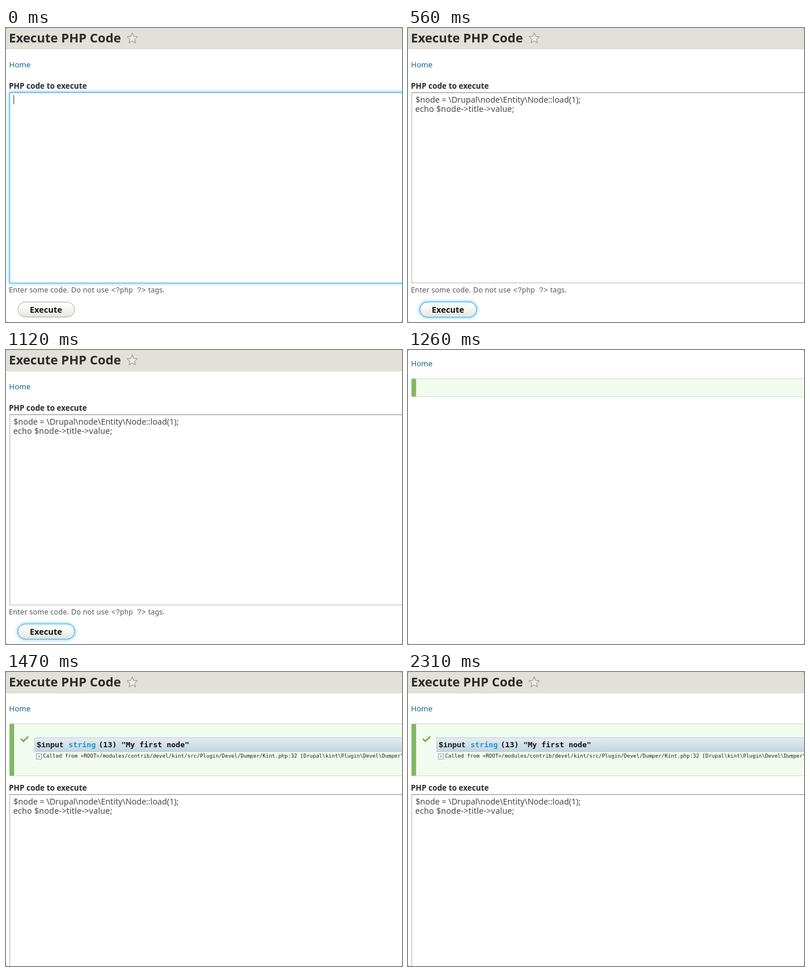
Recreate the animation shown at these times as an HTML page. Size 684 by 508 pixels, loop 2380 ms.

```html
<!DOCTYPE html>
<html lang="en">
<head>
<meta charset="utf-8">
<title>Execute PHP Code</title>
<style>
html, body { margin: 0; width: 100%; height: 100%; overflow: hidden; background: #fff; }
#stage { position: relative; width: 684px; height: 508px; overflow: hidden; background: #fff; }
#stage div { position: absolute; box-sizing: border-box; }
svg { position: absolute; left: 0; top: 0; width: 684px; height: 508px; overflow: visible; }
text { font-family: "Noto Sans", "Open Sans", sans-serif; white-space: pre; }
.bold { font-weight: 700; }
.mono { font-family: "DejaVu Sans Mono", monospace; }
.courier { font-family: "Liberation Mono", monospace; }

#page, #form { left: 0; top: 0; width: 684px; height: 508px; }
#header { left: 0; top: 0; width: 684px; height: 37px; background: #e1e1d9; }
#area { left: 6px; top: 111px; width: 700px; height: 330px; background: #fff;
  border: 1px solid #b8b8b8; border-top-color: #999; box-shadow: inset 0 1px 2px rgba(0, 0, 0, .12); }
#button { left: 20px; top: 473px; width: 99px; height: 27px; border-radius: 14px;
  border: 1px solid #a6a6a6; background: linear-gradient(#fff, #f6f6f3 45%, #e5e5df); }
.focus { inset: -1px; border: 1px solid #45b0e6; border-radius: inherit;
  box-shadow: 0 0 5px 1px #74cdf8; }

#message { left: 6px; top: 89px; width: 700px; height: 91px; overflow: hidden; background: #f3faef;
  border: 1px solid #cbe2bf; border-left: 8px solid #7fb964; border-radius: 2px 0 0 2px; }
#dump { left: 49px; top: 113px; width: 660px; height: 25px; border: 1px solid #b9cfdb;
  background: linear-gradient(#e4edf1, #c1d5e0); }

/* One shared 2380 ms clock */
.anim { animation: 2.38s step-end infinite; }
#page { animation-name: scroll; }
#form { animation-name: form; }
#message { animation-name: message; }
#result { animation-name: result; }
#code { animation-name: typed; }
#caret { animation-name: caret; }
#caretEnd { animation-name: caretEnd; }
#area .focus { animation-name: blur; }
#button .focus { animation-name: focus; }
@keyframes scroll {
  0%, 61.765% { transform: none; }
  52.941% { transform: translateY(-40px); }
  100% { transform: none; }
}
@keyframes form {
  0% { transform: none; opacity: 1; }
  52.941% { transform: none; opacity: 0; }
  58.824%, 100% { transform: translateY(100px); opacity: 1; }
}
@keyframes message {
  0% { opacity: 0; height: 32px; }
  52.941% { opacity: 1; height: 32px; }
  58.824%, 100% { opacity: 1; height: 91px; }
}
@keyframes result { 0% { opacity: 0; } 58.824%, 100% { opacity: 1; } }
@keyframes typed { 0% { opacity: 0; } 2.941%, 100% { opacity: 1; } }
@keyframes caret { 0% { opacity: 1; } 2.941%, 100% { opacity: 0; } }
@keyframes caretEnd { 0%, 14.706%, 100% { opacity: 0; } 2.941% { opacity: 1; } }
@keyframes blur {
  0% { opacity: 1; }
  14.706% { opacity: 1; animation-timing-function: steps(3, start); }
  23.529%, 100% { opacity: 0; }
}
@keyframes focus {
  0% { opacity: 0; }
  14.706% { opacity: 0; animation-timing-function: steps(3, start); }
  23.529% { opacity: 1; }
  52.941%, 100% { opacity: 0; }
}
</style>
</head>
<body>
<div id="stage">
  <div id="page" class="anim">
    <div id="header"></div>
    <svg>
      <text class="bold" x="5" y="25" font-size="21.7" fill="#2b2b2b">Execute PHP Code</text>
      <path id="star" fill="#ecece7" stroke="#8c8c88"/>
      <text x="5.3" y="68" font-size="13" fill="#14648f">Home</text>
    </svg>

    <div id="form" class="anim">
      <div id="area"><div class="focus anim"></div></div>
      <div id="button"><div class="focus anim"></div></div>
      <svg>
        <text class="bold" x="5" y="105" font-size="13.3" fill="#2b2b2b">PHP code to execute</text>
        <g id="code" class="anim" font-size="14" fill="#484848">
          <text x="13" y="129">$node = \Drupal\node\Entity\Node::load(1);</text>
          <text x="12.5" y="145" letter-spacing=".2">echo $node-&gt;title-&gt;value;</text>
        </g>
        <path id="caret" class="anim" d="M13.5 116v16" stroke="#333"/>
        <path id="caretEnd" class="anim" d="M185.5 132v16" stroke="#333"/>
        <g font-size="12.4" fill="#555">
          <text x="5" y="457" letter-spacing=".19">Enter some code. Do not use</text>
          <text class="courier" x="182" y="457">&lt;?php ?&gt;</text>
          <text x="245.5" y="457">tags.</text>
        </g>
        <text class="bold" x="41" y="492" font-size="14.3" fill="#111">Execute</text>
      </svg>
    </div>

    <div id="message" class="anim"></div>
    <div id="result" class="anim">
      <div id="dump"></div>
      <svg>
        <path d="M25.5 115.5l4.5 4 8.5-8" fill="none" stroke="#77b55a" stroke-width="3"/>
        <g class="bold" font-size="13" fill="#111">
          <text class="courier" x="53" y="130">$input</text>
          <text class="mono" x="108" y="130" fill="#2194d2">string</text>
          <text class="mono" x="160" y="130">(13) "My first node"</text>
        </g>
        <path d="M52.5 141.5h9v9h-9zM54.5 146h5M57 143.5v5" fill="#fff" stroke="#8a9aa3"/>
        <text class="mono" x="64" y="148" font-size="9" fill="#1d1d1d">Called from &lt;ROOT&gt;/modules/contrib/devel/kint/src/Plugin/Devel/Dumper/Kint.php:32 [Drupal\kint\Plugin\Devel\Dumper\Kint-&gt;export()]</text>
      </svg>
    </div>
  </div>

  <svg>
    <path d="M0 0h684v508H0zM2 0Q0 0 0 2V506Q0 508 2 508H682Q684 508 684 506V2Q684 0 682 0z"
      fill="#555" fill-rule="evenodd"/>
  </svg>
</div>
<script>
const points = Array.from({ length: 10 }, (_, i) => {
  const r = i % 2 ? 4.3 : 9.6, a = (i * 36 - 90) * Math.PI / 180;
  return `${(218 + r * Math.cos(a)).toFixed(2)} ${(18 + r * Math.sin(a)).toFixed(2)}`;
});
document.getElementById('star').setAttribute('d', `M${points.join('L')}z`);
</script>
</body>
</html>
```
